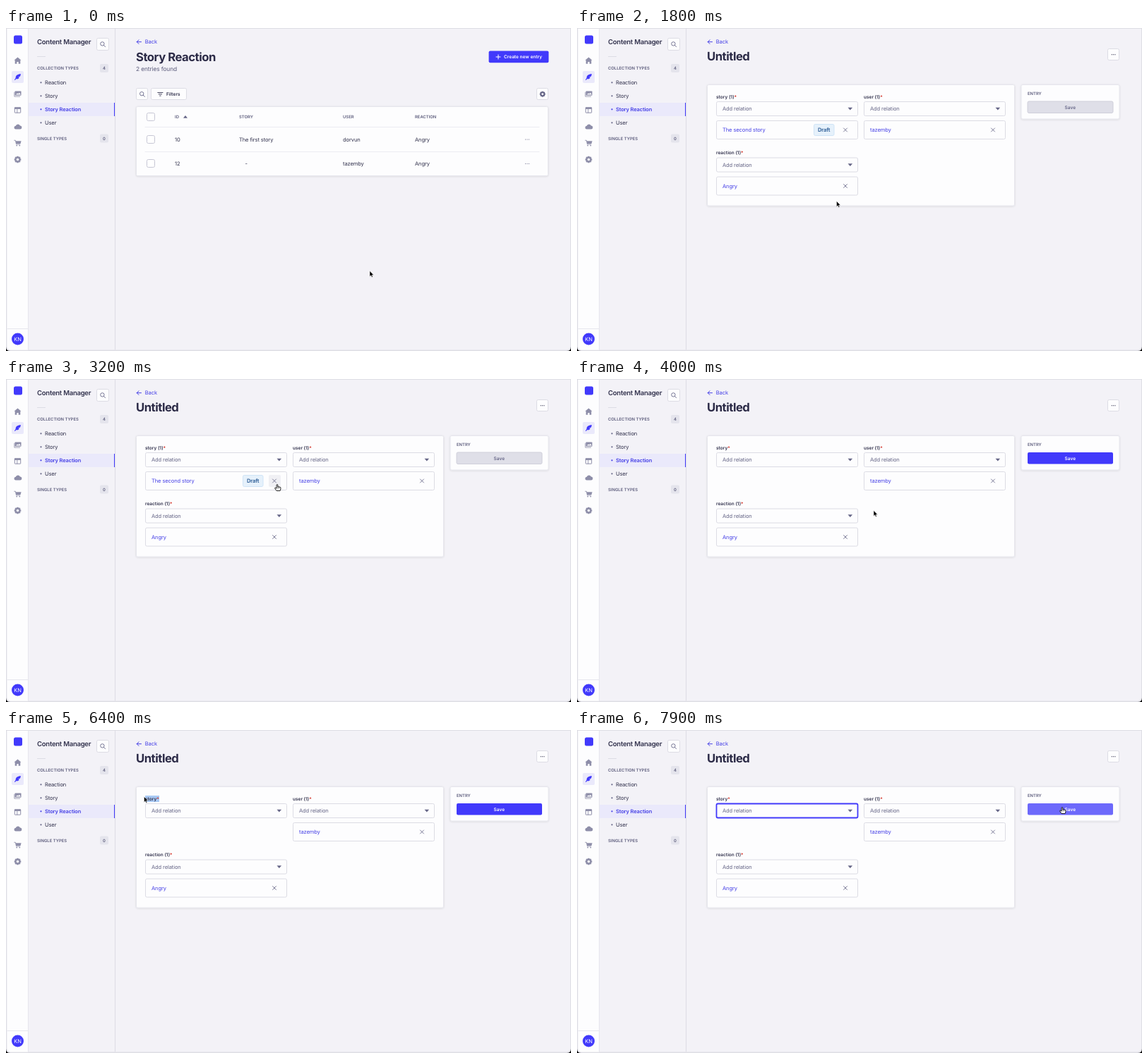
Animation of 800x458 px, one loop 8000 ms. Source, as an HTML page:

```html
<!DOCTYPE html>
<html lang="en">
<head>
<meta charset="utf-8">
<title>Content Manager</title>
<style>
html, body { margin: 0; width: 100%; height: 100%; overflow: hidden; background: #000; }
svg { display: block; width: 800px; height: 458px; }
text {
  font: 400 7.55px Inter, "Liberation Sans", sans-serif; letter-spacing: -.015em;
  font-feature-settings: "calt" 0; text-rendering: geometricPrecision; fill: #32324d; white-space: pre;
}
text.title { font-size: 16.7px; font-weight: 700; letter-spacing: -.03em; fill: #2c2b47; }
text.head { font-size: 9.5px; font-weight: 600; letter-spacing: -.025em; }
text.sub { font-size: 8.4px; fill: #5c5c7c; }
text.caps { font-size: 5.9px; font-weight: 600; letter-spacing: 0; fill: #5c5c7c; }
text.label { font-size: 6.5px; font-weight: 600; letter-spacing: 0; }
text.bold { font-weight: 600; }
text.active { font-weight: 600; font-size: 7.45px; }
text.mid { text-anchor: middle; }
.line { fill: none; stroke-linecap: round; stroke-linejoin: round; }
</style>
</head>
<body>
<svg id="stage" viewBox="0 0 800 458"></svg>
<script>
const BLUE = '#4139fb', LINK = '#4640e6', INK = '#32324d', GREY = '#8e8ea9',
  EDGE = '#dcdce4', PAGE = '#f3f2f7', CARD = '#fdfdfe', MUTED = '#666687';

const rect = (x, y, w, h, fill, r = 0, stroke = 'none', extra = '') =>
  `<rect x="${x}" y="${y}" width="${w}" height="${h}" rx="${r}" fill="${fill}" stroke="${stroke}" ${extra}/>`;
const box = (x, y, w, h, fill = CARD) => rect(x + .5, y + .5, w - 1, h - 1, fill, 2, EDGE);
const text = (x, y, s, cls = '', fill = '') =>
  `<text x="${x}" y="${y}" class="${cls}"${fill && ` style="fill:${fill}"`}>${s}</text>`;
const path = (d, fill, extra = '') => `<path d="${d}" fill="${fill}" ${extra}/>`;
const line = (d, color, w = 1) => `<path class="line" d="${d}" stroke="${color}" stroke-width="${w}"/>`;
const dot = (x, y, r, fill) => `<circle cx="${x}" cy="${y}" r="${r}" fill="${fill}"/>`;
const group = (id, body) => `<g id="${id}">${body}</g>`;
const card = (x, y, w, h) => rect(x, y, w, h, CARD, 2, '#e6e6ed', 'filter="url(#shadow)"');
const dots = (x, y, gap, color) => [-gap, 0, gap].map(d => dot(x + d, y, .6, color)).join('');

const search = (x, y) => `<circle cx="${x - .6}" cy="${y - .6}" r="2.7" fill="none" stroke="${MUTED}" stroke-width=".9"/>`
  + line(`M${x + 1.4} ${y + 1.4}l2.2 2.2`, MUTED, .9);

function gear(x, y, r, color, hole) {
  let teeth = '';
  for (let a = 0; a < 180; a += 45)
    teeth += rect(x - r * .27, y - r, r * .54, r * 2, color, .5, 'none', `transform="rotate(${a} ${x} ${y})"`);
  return teeth + dot(x, y, r * .78, color) + dot(x, y, r * .36, hole);
}

function navIcons() {
  return rect(11, 10.5, 12, 12, BLUE, 2.5)
    + rect(8, 61, 17, 17, '#eae9fb', 2)
    + path('M16.5 41.5l5 4.3h-1.2v5h-2.6v-2.9h-2.4v2.9h-2.6v-5h-1.2z', GREY)
    + path('M21 65.3c-4.3-.2-7.5 2.1-7.4 5.6l-1.7 2.5.8.6 1.6-1.8c3.1.5 4.1-1 4.4-2.3l-1.6-.4 2.5-.5c.8-1.1 1.2-2.3 1.4-3.7z', BLUE)
    + rect(12.5, 89.5, 9, 6.3, GREY, .8) + line('M11.8 91.5v5.7h7.8', GREY, .8)
    + path('M14 94.6l2-2.4 1.3 1.2 1.5-1.8 2 3z', CARD)
    + rect(12.3, 112.8, 8.4, 7.4, 'none', .5, GREY) + rect(12, 112.5, 9, 2.5, GREY) + line('M15.8 115v5', GREY, .9)
    + path('M14 143.6a2.4 2.4 0 0 1-.2-4.8a3.2 3.2 0 0 1 6.1-.3a2.5 2.5 0 0 1-.2 5.1z', GREY)
    + line('M11.8 159.3h1.6l1.2 5.6h5.2', GREY, .9) + path('M13.6 160.2h8l-1.1 3.9h-6.2z', GREY)
    + dot(15.2, 166.6, .9, GREY) + dot(19.3, 166.6, .9, GREY)
    + gear(16.5, 186.5, 4.8, GREY, CARD);
}

function shell() {
  const links = ['Reaction', 'Story', 'Story Reaction', 'User'];
  const badge = (y, n) => rect(133, y - 6, 12, 12, '#e4e4ec', 2) + text(139, y + 2.2, n, 'caps mid');
  return path('M0 0H800V452q0 6-6 6H6q-6 0-6-6z', '#dedee4')
    + path('M1 1H799V451.5q0 5-5 5H6q-5 0-5-5z', PAGE)
    + path('M2 1H31V456.5H6.5q-4.5 0-4.5-5z', CARD)
    + line('M31.5 1V456M2 426.5H31', '#e6e6ed')
    + rect(32, 106, 122, 19, '#eae9fb') + line('M154.5 1V456', EDGE)
    + rect(153, 106, 1, 19, BLUE)
    + navIcons()
    + dot(16.5, 441, 8.5, BLUE) + text(16.5, 443.7, 'KN', 'mid', '#fff')
    + text(44, 23.4, 'Content Manager', 'head')
    + box(128, 14, 18, 18) + search(137, 23)
    + line('M44.5 40.5H55.5', EDGE)
    + text(44, 59.2, 'COLLECTION TYPES', 'caps') + badge(57, 4)
    + text(44, 158.7, 'SINGLE TYPES', 'caps') + badge(156.5, 0)
    + links.map((s, i) => {
      const y = 77.3 + i * 19, on = i === 2;
      return dot(49.5, y, 1.1, on ? LINK : MUTED)
        + text(55, y + 2.7, s, on ? 'active' : '', on ? LINK : INK);
    }).join('')
    + line('M191.5 19.7H185.2M188 16.9L185.2 19.7L188 22.5', LINK, 1)
    + text(196.8, 22.4, 'Back', '', LINK);
}

function listPage() {
  const cols = [[239, 'ID'], [330, 'STORY'], [477, 'USER'], [579, 'REACTION']];
  const rows = [[158, '10', 'The first story', 'dorvun'], [192.5, '12', '-', 'tazemby']];
  const check = y => rect(199.5, Math.floor(y) - 5.5, 11, 11, '#fff', 2, '#c6c6d4');
  return text(184, 47, 'Story Reaction', 'title')
    + text(184, 61, '2 entries found', 'sub')
    + rect(683.6, 32.6, 84.8, 16.6, BLUE, 2) + line('M697 38V44M694 41H700', '#fff', 1)
    + text(705, 43.3, 'Create new entry', 'label', '#fff')
    + box(184, 85, 17, 17) + search(192.8, 93.8)
    + box(205, 85, 51, 17) + line('M214.8 91.5H222M216.2 93.8H220.6M217.6 96.1H219.2', INK, .9)
    + text(227, 96, 'Filters', 'label')
    + box(751, 85, 17, 17) + gear(759.7, 93.7, 4, MUTED, CARD)
    + card(184.5, 111.5, 583, 98)
    + rect(185, 176, 582, 33, PAGE, 0, 'none', 'id="rowHover"')
    + line('M197 140.5H755M197 175.5H755', '#ececf2')
    + check(126) + cols.map(([x, s]) => text(x, 128.2, s, 'caps')).join('')
    + path('M251 127.7l3-3.6 3 3.6z', MUTED)
    + rows.map(([y, id, story, user]) => check(y)
      + text(239, y + 2.7, id) + text(story === '-' ? 338.5 : 330, y + 2.7, story)
      + text(477, y + 2.7, user) + text(579, y + 2.7, 'Angry')
      + dots(738, y, 2.4, MUTED)).join('');
}

const cross = (x, y) => line(`M${x - 2.5} ${y - 2.5}l5 5m0 -5l-5 5`, MUTED, .85);

function select(x, y, id) {
  return rect(x + .5, y - 9.8, 200, 20, CARD, 2, EDGE, `id="${id}"`)
    + text(x + 9, y + 2.9, 'Add relation', '', MUTED)
    + path(`M${x + 186.5} ${y - 1.6}h6.6l-3.3 3.9z`, MUTED);
}
const label = (x, y, s) => text(x, y, `${s}<tspan fill="#d02b20">*</tspan>`, 'label');
const relation = (x, y, s, hover = '') => box(x, y - 13.5, 201, 27) + hover
  + text(x + 9, y + 2.7, s, '', LINK) + cross(x + 183, y);

function formPage() {
  const hover = rect(372, 136, 17, 17, '#f0f0f4', 2, 'none', 'id="crossHover"');
  return text(184, 46.2, 'Untitled', 'title')
    + box(751, 29, 17, 17) + dots(759.6, 37.7, 2.3, INK)
    + card(184.5, 80.5, 435, 171.5) + card(629, 80.5, 139, 48.5)
    + rect(197, 93, 0, 9, '#a8c9f4', 0, 'none', 'id="selection"')
    + group('labelFull', label(197, 99.6, 'story (1)')) + group('labelEmpty', label(197, 99.6, 'story'))
    + label(406, 99.6, 'user (1)') + label(197, 179.2, 'reaction (1)')
    + select(197, 114.3, 'storySelect') + select(406, 114.3, 'userSelect') + select(197, 193.8, 'reactionSelect')
    + group('story', relation(197, 144.5, 'The second story', hover)
      + rect(335.5, 136.5, 28.5, 16, '#e6f1fb', 2, '#cfe4f7') + text(349.7, 147.3, 'Draft', 'bold mid', '#2a5b95'))
    + relation(406, 144.5, 'tazemby') + relation(197, 224, 'Angry')
    + text(638, 95.2, 'ENTRY', 'caps')
    + rect(638, 104, 121, 16.5, BLUE, 2, 'none', 'id="save"')
    + '<text id="saveText" class="label mid" x="698.3" y="114.6">Save</text>';
}

const cursors = group('arrow', path('M0 -.6V7.4L1.8 5.7L3 8.4L4.3 7.8L3.2 5.2H5.6z', '#000', 'stroke="#fff" stroke-width=".5"'))
  + group('hand', path('M-.9 .6q.9-1.2 1.8 0V3.5l.6-.3 1 .3.7-.1.8.5.8.2q.6 2.3-.7 4.9H-.9L-3.3 5.6q-.2-1.3 1-.9L-.9 5.7z',
    '#fff', 'stroke="#000" stroke-width=".85" stroke-linejoin="round"')
  + line('M.9 3.5v2M2.5 3.7v1.7', '#000', .5));

document.getElementById('stage').innerHTML =
  `<defs><filter id="shadow" x="-5%" y="-10%" width="110%" height="125%">
    <feDropShadow dx="0" dy=".6" stdDeviation="1" flood-color="#212134" flood-opacity=".13"/></filter></defs>`
  + shell() + group('list', listPage()) + group('form', formPage()) + group('cursor', cursors);

const LOOP = 8000, OPENED = 1300, REMOVED = 3700, DRAG = 5600, FOCUSED = 6800;
// Pointer stops: time, x, y
const stops = [
  [100, 515, 345], [800, 430, 195], [1200, 430, 195], [1800, 367.5, 246],
  [2000, 367.5, 246], [2800, 384, 149.5], [3700, 384, 149.5], [4000, 420, 187],
  [4300, 420, 187], [5200, 217.5, 95], [5600, 217.5, 95], [6200, 195.5, 95],
  [6900, 195.5, 95], [7700, 687, 109.5]
];

function pointer(t) {
  const i = stops.findIndex(s => s[0] > t);
  if (i < 1) return stops.at(i).slice(1);
  const [t0, x0, y0] = stops[i - 1], [t1, x1, y1] = stops[i];
  const p = (t - t0) / (t1 - t0), e = p * p * (3 - 2 * p);
  return [x0 + (x1 - x0) * e, y0 + (y1 - y0) * e];
}

const $ = id => document.getElementById(id);
const show = (id, on) => $(id).setAttribute('display', on ? 'inline' : 'none');
const set = (id, attrs) => Object.entries(attrs).forEach(([k, v]) => $(id).setAttribute(k, v));

function draw(t) {
  const [x, y] = pointer(t);
  const over = (l, top, r, b) => x > l && x < r && y > top && y < b;
  const list = t < OPENED, removed = t >= REMOVED, focused = t >= FOCUSED;
  const onRow = list && over(185, 176, 767, 209);
  const onCross = !list && !removed && over(372, 136, 389, 153);
  const onSave = removed && over(638, 104, 759, 121);
  const hand = onRow || onCross || onSave;

  show('list', list);
  show('form', !list);
  show('rowHover', onRow);
  show('crossHover', onCross);
  show('story', !removed);
  show('labelFull', !removed);
  show('labelEmpty', removed);

  const left = Math.max(197, x);
  set('selection', { x: left, width: t > DRAG && !focused ? Math.max(0, 217 - left) : 0 });
  set('storySelect', { stroke: focused ? BLUE : EDGE, 'stroke-width': focused ? 1.8 : 1 });
  set('save', { fill: !removed ? '#dfdfe8' : onSave ? '#6d69fb' : BLUE, stroke: removed ? 'none' : '#cfcfda' });
  $('saveText').style.fill = removed ? '#fff' : MUTED;

  show('arrow', !hand);
  show('hand', hand);
  set('cursor', { transform: `translate(${x} ${y})` });
}

const start = performance.now();
function tick() {
  const t = (performance.now() - start) % LOOP;
  draw(Math.floor(t / 100) * 100);
  requestAnimationFrame(tick);
}
tick();
</script>
</body>
</html>
```
